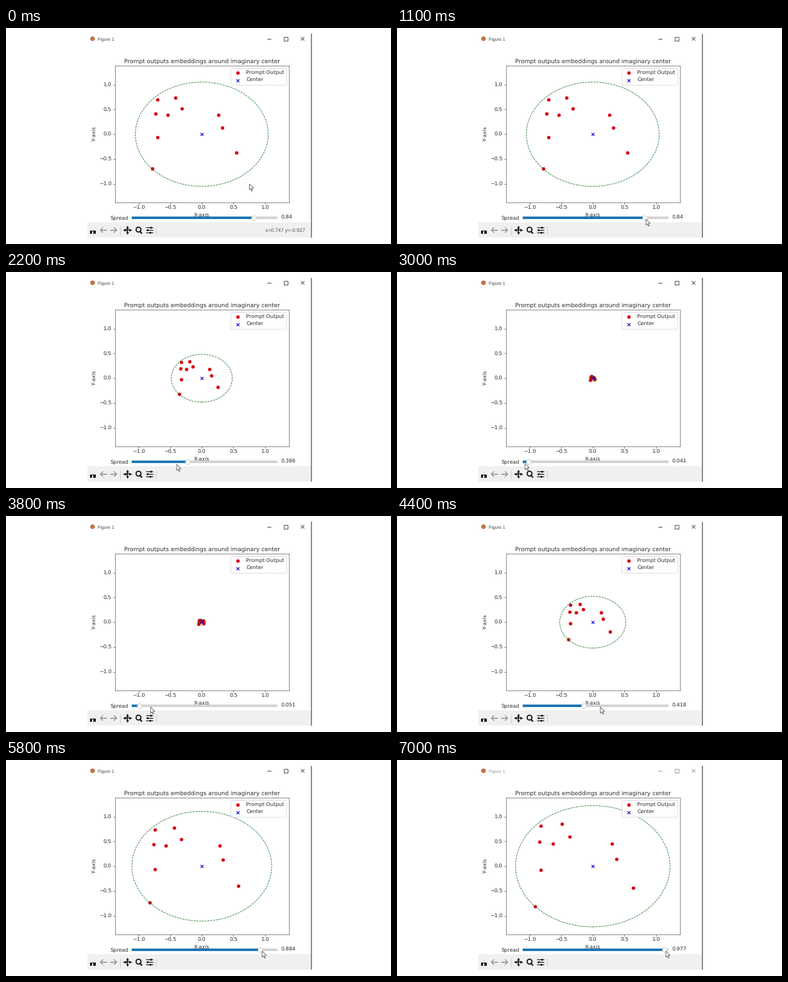
A matplotlib script for the animation above (7100 ms loop, 600 by 338 pixels).

```python
import numpy as np
import matplotlib.pyplot as plt
from matplotlib.animation import FuncAnimation
from matplotlib.patches import Circle, Polygon, Rectangle

W, H = 600, 338
STEP, FRAMES = 100, 71
K = 0.546
PX = 0.72           # points per pixel
INK, TEXT = "#161616", "#2a2a2a"
CX, CY = 305.1, 166.2
HALF_W, HALF_H = 135.5, 106.8
LIM = 1.375
TRACK_X, TRACK_W, TRACK_Y = 196.0, 226.5, 296.8
PRESS, LAG, GRIP = 1400, 150, 1.7

plt.rcParams.update({
    "font.family": "DejaVu Sans", "font.size": 10 * K,
    "text.hinting": "no_hinting", "text.hinting_factor": 1,
    "text.color": TEXT, "axes.labelcolor": TEXT, "axes.edgecolor": "#404040",
    "axes.titlesize": 12 * K, "axes.titlepad": 6 * K,
    "axes.labelpad": 4 * K, "axes.linewidth": 0.8 * K,
    "lines.linewidth": 1.5 * K, "patch.linewidth": K,
})
for side in "xy":
    plt.rcParams.update({
        f"{side}tick.major.size": 3.5 * K, f"{side}tick.major.width": 0.8 * K,
        f"{side}tick.major.pad": 3.5 * K, f"{side}tick.color": TEXT,
    })

POINTS = np.array([
    (-0.84, 0.835), (-0.50, 0.873), (-0.37, 0.613), (-0.867, 0.50),
    (-0.64, 0.467), (-0.84, -0.07), (-0.935, -0.83), (0.315, 0.467),
    (0.382, 0.153), (0.649, -0.444),
])
ARROW = np.array([(0, 0), (0, 9.4), (2.1, 7.5), (3.6, 11), (5, 10.4),
                  (3.6, 7), (6.6, 6.8)])


def smooth(u):
    return u * u * (3 - 2 * u)


def slow_down(u):
    return 1 - (1 - u) ** 1.7


# pointer moves: start, duration, dx, dy, easing
START = np.array([378.0, 230.9])
MOVES = [
    (-200, 800, 8, 84.1, smooth),
    (600, 500, 2, -16, smooth),
    (PRESS, 1800, -193, 0, slow_down),
    (3350, 1850, 203, 0, smooth),
    (5700, 700, 21, 0, smooth),
]


def progress(t, start, length):
    return np.clip((t - start) / length, 0, 1)


def pointer_at(t):
    pos = START.copy()
    for start, length, dx, dy, ease in MOVES:
        pos += np.array([dx, dy]) * ease(progress(t, start, length))
    # the hand sags a little during each drag
    pos[1] += 2 * np.sin(np.pi * progress(t, PRESS, 1800))
    pos[1] += 10 * np.sin(np.pi * progress(t, 4400, 800))
    return pos


def spread_at(t):
    x = pointer_at(max(t - LAG, PRESS))[0]
    return np.clip((x - GRIP - TRACK_X) / TRACK_W, 0, 1)


def readout_at(t):
    x, y = pointer_at(t - 55)
    if y > CY + HALF_H:
        return ""
    return (f"x={(x - CX) / HALF_W * LIM:.3f} "
            f"y={(CY - y) / HALF_H * LIM:.3f}")


fig = plt.figure(figsize=(W / 100, H / 100), dpi=100, facecolor="white")


def layer(z):
    ax = fig.add_axes([0, 0, 1, 1], zorder=z)
    ax.set(xlim=(0, W), ylim=(H, 0))
    ax.axis("off")
    return ax


back, front = layer(0), layer(2)


def rect(ax, x, y, w, h, color):
    return ax.add_patch(Rectangle((x, y), w, h, fc=color, lw=0, zorder=2))


def box(x, y, w, h, width=1.0):
    return back.add_patch(Rectangle((x, y), w, h, fill=False, ec=INK,
                                    lw=width * PX, joinstyle="miter"))


def line(xs, ys, color=INK, width=1.0):
    return back.plot(xs, ys, color=color, lw=width * PX,
                     solid_capstyle="butt", solid_joinstyle="miter")[0]


def draw_history(tip, way):
    y, grey = 316.2, "#8c8c8c"
    for reach in (4.2, 8):
        line([tip + reach * way, tip, tip + reach * way][:2 + (reach < 5)],
             [y - 4.2, y, y + 4.2] if reach < 5 else [y, y], grey, 1.2)
    line([tip, tip + 10 * way], [y, y], grey, 1.4)


def draw_toolbar():
    rect(back, 127, 304, 349, 24, "#f0f0f0")
    y = 316.2
    # home
    back.add_patch(Polygon([(129, 317), (135.2, 310.8), (141.4, 317)],
                           fc=INK, lw=0))
    rect(back, 130.9, 316.5, 8.6, 5.2, INK)
    rect(back, 134, 318.2, 2.4, 3.5, "#f0f0f0")
    draw_history(147, 1)
    draw_history(172.4, -1)
    # pan
    x = 189
    line([x - 5, x + 5], [y, y], width=1.6)
    line([x, x], [y - 5, y + 5], width=1.6)
    for marker, dx, dy in ((">", 1, 0), ("<", -1, 0), ("v", 0, 1), ("^", 0, -1)):
        back.plot(x + 4.8 * dx, y + 4.8 * dy, marker, color=INK,
                  ms=4.4 * PX, mew=0)
    # zoom
    back.plot(205.6, 315, "o", mfc="none", mec=INK, ms=7.6 * PX, mew=1.8 * PX)
    line([208.2, 212], [317.8, 321.6], width=2.2)
    # settings
    for dy, knob in ((-4, 226), (0, 220.5), (4, 225)):
        line([217.6, 229], [y + dy, y + dy], width=1.2)
        rect(back, knob - 1, y + dy - 1.6, 2, 3.2, INK)
    # save
    box(239.5, 311.4, 10, 10)
    box(241.6, 311.4, 4.8, 3)
    box(241.6, 317.2, 6, 4.2)
    for x in (178.3, 234.3):
        line([x, x], [309.5, 323.5], "#cfcfcf")


def draw_title_bar():
    back.add_patch(Circle((134.8, 16.8), 3.6, fc="#c4703f", lw=0))
    label = back.text(143, 17, "Figure 1", family="Liberation Sans",
                      size=6.6 * PX, va="center_baseline")
    marks = [line([407, 413], [17, 17]), box(433, 14, 5.6, 5.6, 0.9)]
    for ends in ([14.2, 19.6], [19.6, 14.2]):
        marks.append(line([459.6, 465], ends, width=0.9))
    return [label] + marks


draw_toolbar()
title_bar = draw_title_bar()
line([475.8, 475.8], [9, 328], "#666666", 1.5)
readout = back.text(466.5, 316.2, "", family="Liberation Sans", size=7.6 * PX,
                    color="#555555", ha="right", va="center_baseline")

# plot
plot = fig.add_axes([(CX - HALF_W) / W, 1 - (CY + HALF_H) / H,
                     2 * HALF_W / W, 2 * HALF_H / H], zorder=1)
ticks = np.arange(-1, 1.1, 0.5)
plot.set(xlim=(-LIM, LIM), ylim=(-LIM, LIM), xticks=ticks, yticks=ticks,
         xlabel="X-axis", ylabel="Y-axis",
         title="Prompt outputs embeddings around imaginary center")
dots = plot.scatter(*POINTS.T, s=38 * K**2, color="#d6000f",
                    label="Prompt Output")
plot.scatter(0, 0, s=36 * K**2, color="#0a0acd", marker="x", label="Center")
circle = plot.add_patch(Circle((0, 0), 1, fill=False, ec="#1f7527",
                               ls="--", lw=1.1 * K))
plot.legend(loc="upper right")

# slider
rect(front, TRACK_X, TRACK_Y - 2.1, TRACK_W, 4.2, "#d3d3d3")
bar = rect(front, TRACK_X, TRACK_Y - 2.1, 0, 4.2, "#1f77b4")
knob, = front.plot([], [], "o", ms=10 * K, mfc="white", mec="#bfbfbf", mew=K)
front.text(191, TRACK_Y, "Spread", ha="right", va="center")
value = front.text(428, TRACK_Y, "", va="center")
pointer = front.add_patch(Polygon(ARROW, fc="white", ec="#505050",
                                  lw=0.8 * PX, zorder=5))


def update(i):
    t = i * STEP
    spread = spread_at(t)
    dots.set_offsets(POINTS * spread)
    circle.set_radius(1.25 * spread)
    bar.set_width(TRACK_W * spread)
    knob.set_data([TRACK_X + TRACK_W * spread], [TRACK_Y])
    value.set_text(f"{round(spread, 3):g}")
    pointer.set_xy(ARROW + pointer_at(t))
    readout.set_text(readout_at(t))
    color = "#999999" if t >= 6800 else "#444444"
    for part in title_bar:
        if isinstance(part, Rectangle):
            part.set_edgecolor(color)
        else:
            part.set_color(color)
    return []


anim = FuncAnimation(fig, update, frames=FRAMES, interval=STEP,
                     repeat=True, repeat_delay=0, blit=False)
plt.show()
```
